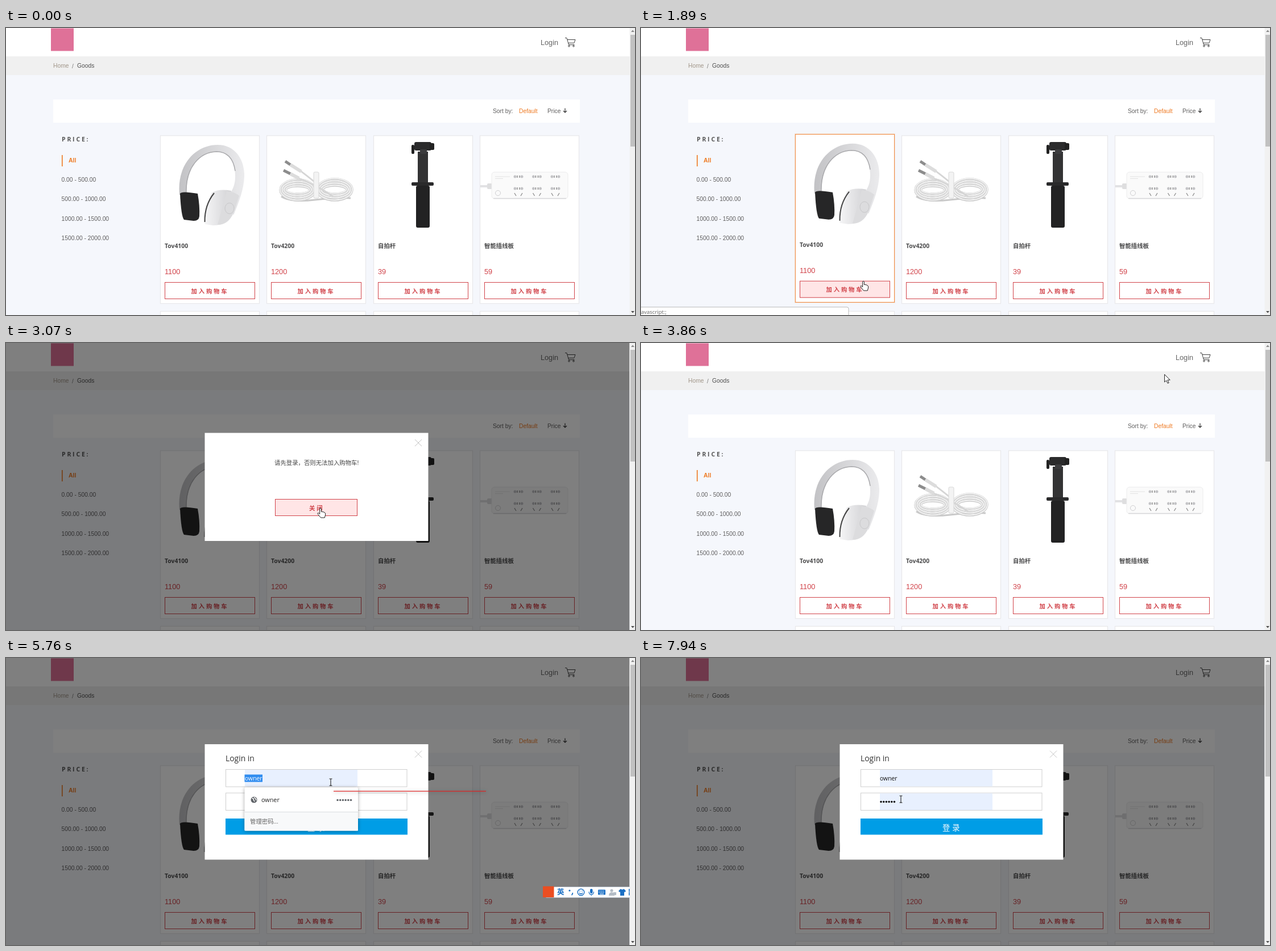
Animation, 1106 px wide and 506 px high, one loop 7.99 s. Source, as an HTML page:

```html
<!DOCTYPE html>
<html lang="en">
<head>
<meta charset="utf-8">
<title>Shop login</title>
<style>
  html, body { margin: 0; width: 100%; height: 100%; overflow: hidden; }
  svg { display: block; width: 100%; height: 100%; }
  text { font-family: "Liberation Sans", "Noto Sans CJK SC", "Noto Sans CJK", sans-serif; white-space: pre; }
  .open { font-family: "Open Sans", "Noto Sans CJK SC", "Noto Sans CJK", sans-serif; }
  .bold { font-weight: 700; }
  .wide { letter-spacing: 2.9px; }
  .drop { filter: drop-shadow(0 1px 3px rgba(0, 0, 0, .35)); }
</style>
</head>
<body>
<svg id="stage" viewBox="0 0 1106 506"></svg>
<script>
const LOOP = 7990;
const RED = '#d1434a', ORANGE = '#ee7a23', BLUE = '#1a6fc4';

// Markup helpers
const rect = (x, y, w, h, fill, extra = '') =>
  `<rect x="${x}" y="${y}" width="${w}" height="${h}" fill="${fill}" ${extra}/>`;
const path = (d, stroke, width = 1, fill = 'none', extra = '') =>
  `<path d="${d}" stroke="${stroke}" stroke-width="${width}" fill="${fill}" ${extra}/>`;
const circle = (x, y, r, fill, extra = '') =>
  `<circle cx="${x}" cy="${y}" r="${r}" fill="${fill}" ${extra}/>`;
const ring = (x, y, rx, ry, stroke, width) =>
  `<ellipse cx="${x}" cy="${y}" rx="${rx}" ry="${ry}" fill="none" stroke="${stroke}" stroke-width="${width}"/>`;
const text = (x, y, label, size = 10.3, fill = '#605f5f', cls = '') =>
  `<text x="${x}" y="${y}" font-size="${size}" fill="${fill}" class="${cls}">${label}</text>`;
const group = (id, body, extra = '') => `<g id="${id}" ${extra}>${body}</g>`;
const repeat = (n, fn) => Array.from({ length: n }, (_, i) => fn(i)).join('');
const dots = (x, y, fill) => repeat(6, i => circle(x + i * 4.7, y, 1.75, fill));
const gradient = (id, from, to) => `<linearGradient id="${id}">
  <stop stop-color="${from}"/><stop offset="1" stop-color="${to}"/></linearGradient>`;

const headphones =
  path('M305 294C300 240 334 206 372 206C405 206 420 235 419 262C418 285 410 306 400 330L388 300C400 285 403 275 403 262C403 238 395 219 370 218C340 219 316 245 317 294Z',
    'none', 0, 'url(#band)') +
  path('M317 290C316 246 340 219 370 218C390 218 400 232 403 252', '#a9a9ac', 1.5) +
  path('M306 292Q308 287 337 292Q341 314 340 332Q339 340 330 340L313 338Q308 332 306 292Z', 'none', 0, '#262627') +
  path('M362 290Q376 283 396 287L386 340Q380 348 364 348L350 346Q345 336 353 313Z', 'none', 0, 'url(#cup)') +
  path('M349.500 342Q349 312 366 291', '#444', 2) +
  path('M388 288Q401 288 410 296L400 326Q391 347 372 347Z', 'none', 0, '#dcdcde') +
  ring(393, 318, 8, 9.5, '#c8c8ca', 1);

const cable =
  path('M484 297Q500 308 543 303T606 300', '#c9c9c9', 3) +
  repeat(4, i => ring(513, 285.5, 31 - i * 3.5, 18.5 - i * 4, '#c8c8c8', 3.4) +
    ring(513, 285, 31 - i * 3.5, 18.5 - i * 4, '#efefef', 2.2) +
    ring(578, 285, 31 - i * 3.5, 19 - i * 4, '#c8c8c8', 3.4) +
    ring(578, 284.5, 31 - i * 3.5, 19 - i * 4, '#f1f1f1', 2.2)) +
  path('M512 264Q545 276 575 297M518 252Q535 265 548 276', '#d5d5d5', 2.8) +
  path('M491 235L500 241M488 251L500 257', '#8c8c8c', 5) +
  path('M500 241L519 253M500 257L515 265', '#dcdcdc', 6) +
  rect(541, 254, 9, 46, '#f3f3f3', 'rx="2" stroke="#d8d8d8"');

const stick =
  rect(724, 218, 18, 58, '#333334') + rect(721, 278, 24, 74, '#222223', 'rx="3"') +
  rect(718, 201, 30, 15, '#2b2b2c', 'rx="3"') + rect(713, 206, 5, 16, '#222', 'rx="2"') +
  rect(745, 203, 8, 12, '#222', 'rx="2"') + rect(728, 214, 12, 8, '#3c3c3e', 'rx="2"') +
  rect(713, 272, 39, 6, '#2a2a2b', 'rx="2"');

const sockets =
  path('M834 279H856', '#e2e2e4', 4) + rect(846, 274, 9, 10, '#dededf', 'rx="2"') +
  rect(854, 254, 134, 47, '#fafafa', 'rx="5" stroke="#ececed"') +
  path('M857 300.500H985', '#d8d8d9', 1.5) + path('M860 262H886M860 265.500H874', '#e2e2e2', 1) +
  circle(865, 291, 4.5, 'none', 'stroke="#cfcfd1"') +
  repeat(3, i => {
    const x = 901 + i * 32.5;
    return [262, 283].map(y => circle(x - 6, y, 2.5, '#c4c4c7') + circle(x + 6, y, 2.5, '#c4c4c7') +
      path(`M${x - 2} ${y - 2}v4M${x + 2} ${y - 2}v4`, '#777', 1.2)).join('') +
      path(`M${x - 7} 291l3 5M${x + 7} 291l-3 5`, '#8c8c8c', 1.3);
  });

const products = [
  ['Tov4100', 1100, headphones], ['Tov4200', 1200, cable], ['自拍杆', 39, stick], ['智能插线板', 59, sockets]
];
const cardX = i => Math.floor(271 + i * 187.5);
const cardFrame = (i, y, extra) => rect(cardX(i) + .5, y, 174, 296, '#fff', extra);
const plainEdge = 'stroke="#e8e8ea" stroke-width="1.2"';

const card = ([name, price, photo], i) => {
  const x = cardX(i);
  return group('card' + i,
    cardFrame(i, 189.8, plainEdge) +
    group('glow' + i, cardFrame(i, 189.8, `stroke="${ORANGE}" stroke-width="3" stroke-opacity=".2"`) +
      cardFrame(i, 189.8, `stroke="${ORANGE}" stroke-opacity=".8"`)) +
    photo + text(x + 8, 388, name, 10.4, '#4c4c4d', 'open bold') +
    text(x + 8, 434, price, 12.7, RED) +
    rect(x + 8.5, 448.5, 158, 29, '#fff', `id="buy${i}" stroke="${RED}"`) +
    text(x + 54.5, 467.5, '加入购物车', 10.3, RED, 'bold wide'));
};

const page =
  `<defs>${gradient('band', '#c2c2c5', '#ebebed')}${gradient('cup', '#f6f6f7', '#d2d2d5')}</defs>` +
  rect(0, 0, 1106, 506, '#f5f7fc') + rect(0, 0, 1097, 50, '#fff') + rect(0, 50, 1097, 33, '#f0f0f0') +
  rect(79, 0.5, 40, 40, '#df7198') +
  text(940, 30, 'Login', 12.7, '#666') +
  path('M983 17.500H986L989.500 29.500H999.500M986.800 20.500H1001L999 26.500H988.500', '#444', 1) +
  circle(990, 31.8, 1.3, 'none', 'stroke="#444"') + circle(998, 31.8, 1.3, 'none', 'stroke="#444"') +
  text(83, 69.5, 'Home', 10.3, '#a09588') + text(116, 71, '/', 10, '#777') + text(125, 69.5, 'Goods', 10.3, '#505050') +
  rect(83, 126, 926, 41, '#fff') + text(856, 149.5, 'Sort by:') + text(902, 149.5, 'Default', 10.3, ORANGE) +
  text(952, 149.5, 'Price') + path('M983 141.500V149M980 146L983 149L986 146', '#333', 1.2) +
  `<text x="98" y="200" font-size="10.5" fill="#555" class="open bold" letter-spacing="2.8">PRICE:</text>` +
  rect(98, 224, 1.6, 20, ORANGE) + text(110, 237, 'All', 10.5, ORANGE, 'bold') +
  ['0.00 - 500.00', '500.00 - 1000.00', '1000.00 - 1500.00', '1500.00 - 2000.00']
    .map((range, i) => text(97.5, 271 + i * 34.3, range)).join('') +
  products.map(card).join('') +
  repeat(4, i => cardFrame(i, 499.5, plainEdge));

const closeCross = y => path(`M719 ${y - 6}l12 12m0-12l-12 12`, '#c4c4c4', 1);

const notice =
  rect(349.5, 158.5, 393, 190.5, '#fff') + closeCross(176) +
  text(472, 214.5, '请先登录，否则无法加入购物车!', 10.4, '#444') +
  rect(473.5, 275.5, 144, 29, '#fff', `id="closeButton" stroke="${RED}"`) +
  text(533, 294.5, '关闭', 10.4, RED, 'bold wide');

const input = y => rect(386.5, y, 318.5, 30.5, '#fff', 'stroke="#cfcfcf"') + rect(420, y + .5, 198, 29.5, '#e8f0fe');

const login =
  rect(349.5, 152, 393, 203.5, '#fff') + closeCross(169.5) +
  text(386, 182, 'Login in', 13.9, '#333', 'open') +
  input(196.5) + input(238) +
  rect(419.5, 205.5, 31.5, 13, '#2f8cf0', 'id="selection"') +
  `<text id="user" x="420" y="215.5" font-size="10.4" class="open">owner</text>` +
  dots(422, 253.5, '#111') +
  rect(386, 283, 320, 28.5, '#009de6') +
  `<text x="530" y="303.5" font-size="13.3" fill="#fff" letter-spacing="4">登录</text>`;

const suggestions =
  rect(419.5, 228, 199.5, 76.5, '#fff', 'rx="2" class="drop"') +
  rect(419.5, 228, 199.5, 43, '#f1f3f4', 'id="hoverRow"') +
  rect(419.5, 271, 199.5, 33.5, '#f8f9fa') + path('M419.500 271.500H619', '#dadce0') +
  circle(436, 250, 5.5, '#5f6368') + path('M432.500 247l3 1.500 0 2.500 2 2M436 245.500l3 2.500 1 3', '#fff', 1.4) +
  text(449, 254, 'owner', 10.8, '#222', 'open') + dots(583, 250.5, '#5f6368') +
  text(429, 292, '管理密码...', 10.4, '#666', 'open');

const inputBar =
  rect(950, 403.5, 160, 19, '#fff', 'stroke="#aab4c0"') + rect(944, 402.5, 19.5, 19.5, '#ea4e22') +
  text(969, 417, '英', 12.5, BLUE, 'bold') + circle(991, 410, 1.6, BLUE) + path('M996 414q1 2-1.500 4', BLUE, 1.8) +
  circle(1011, 413, 5.8, 'none', `stroke="${BLUE}" stroke-width="1.4"`) +
  path('M1008 414q3 4 6 0M1009 410v1.500M1013 410v1.500', BLUE, 1.3) +
  rect(1027, 407, 4.5, 8, BLUE, 'rx="2"') + path('M1025 412q0 5 4.200 5t4.200-5M1029.200 417v2', BLUE, 1.2) +
  rect(1041, 408.5, 13, 9, BLUE, 'rx="1"') + path('M1042.500 411h10M1042.500 413.500h10', '#fff', 1, 'none', 'stroke-dasharray="1.500 1"') +
  path('M1044 416h7', '#fff', 1) +
  circle(1065, 410, 2.6, '#b3bcc6') + path('M1060 419q0-6 5-6t5 6Z', 'none', 0, '#b3bcc6') + rect(1068, 413, 5, 5, '#b3bcc6') +
  path('M1080 407.500h2q1.500 2 3 0h2l3 3.500-2 2-1-1v7h-7v-7l-1 1-2-2Z', 'none', 0, BLUE) +
  repeat(4, i => rect(1095.5 + (i % 2) * 6.5, 407.5 + (i >> 1) * 6, 4.5, 4.5, i === 1 ? 'none' : BLUE, `stroke="${BLUE}"`));

const scrollbar =
  rect(1096.5, 0, 10, 506, '#f1f1f1') + rect(1098, 12, 8, 197, '#c1c1c1') +
  path('M1099 7l3-3.500 3 3.500Z', 'none', 0, '#8a8a8a') + path('M1099 499l3 3.500 3-3.500Z', 'none', 0, '#505050');

const pointers =
  group('arrow', path('M0 0V13.500L3.200 10.700L5.500 15.700L7.600 14.800L5.400 9.800H9.700Z', '#222', 1, '#fff')) +
  group('hand', path('M-1.300 1.200Q0-1 1.400 1.200V6.500Q5.500 6 8 8.500Q9 9.500 8.600 12L7.300 17H.5L-4.800 10.500Q-5.500 8-3.300 8.700L-1.300 10.500Z', '#222', 1, '#fff')) +
  group('beam', path('M-2.500-6H-.8L0-5.300L.8-6H2.500M0-5.300V5.300M-2.500 6H-.8L0 5.300L.8 6H2.500', '#222', 1.1));

document.getElementById('stage').innerHTML =
  page + group('dim', rect(0, 0, 1096.5, 506, '#000', 'opacity=".5"')) +
  group('notice', notice) + group('login', login) + group('suggestions', suggestions) +
  group('panel', rect(576, 235, 268, 178, '#fff', 'id="panelBody"') + rect(576, 234.3, 268, 1.2, '#e02020'), 'class="drop"') +
  group('inputBar', inputBar) +
  group('status', path('M-2 492H362Q365 492 365 495V508H-2Z', '#b8b8b8', 1, '#fff') +
    `<text id="link" x="0" y="503.5" font-size="9.5" fill="#666" class="open"></text>`) +
  scrollbar + group('pointer', pointers);

// Timeline
const el = id => document.getElementById(id);
const show = (id, on) => el(id).setAttribute('display', on ? 'inline' : 'none');
const set = (id, name, value) => el(id).setAttribute(name, value);
const clamp = v => Math.max(0, Math.min(1, v));
const within = (t, [from, to]) => t >= from && t < to;

// Same curve as the CSS "ease" keyword
function ease(x) {
  x = clamp(x);
  let lo = 0, hi = 1;
  for (let i = 0; i < 14; i++) {
    const u = (lo + hi) / 2;
    if (.75 * u * (1 - u) + u ** 3 < x) lo = u; else hi = u;
  }
  return .3 * lo * (1 - lo) ** 2 + 3 * lo * lo * (1 - lo) + lo ** 3;
}

const track = [
  [400, 885, 500], [500, 720, 470], [600, 455, 440], [880, 411, 432], [1200, 411, 432], [1480, 388, 447],
  [1620, 388, 447], [1640, 391, 446], [2250, 391, 446], [2650, 572, 325], [2770, 553, 291], [3140, 553, 291],
  [3730, 915, 62], [3780, 915, 62], [4080, 946, 25], [4410, 946, 25], [4570, 715, 165], [4800, 571, 219],
  [6240, 571, 219], [6400, 540, 248], [6780, 540, 248], [7180, 402, 250], [7340, 402, 250], [7500, 384, 246],
  [7900, 457, 249]
];

function pointerAt(t) {
  const next = track.findIndex(k => k[0] > t);
  if (next < 0) return track[track.length - 1].slice(1);
  const [t0, x0, y0] = track[Math.max(0, next - 1)], [t1, x1, y1] = track[next];
  const p = clamp((t - t0) / (t1 - t0 || 1)), s = p * p * (3 - 2 * p);
  return [x0 + (x1 - x0) * s, y0 + (y1 - y0) * s];
}

const hovers = [[[600, 2290]], [[540, 600], [3140, 3270]], [[460, 540], [3270, 3390]], [[400, 460]]];
const hoverAt = (t, spans) => Math.max(...spans.map(([from, to]) =>
  t < from ? 0 : ease((Math.min(t, to) - from) / 300) * (1 - ease((t - to) / 300))));

const noticeSpan = [2010, 3130], loginSpan = [4240, LOOP];
const buyHover = [1270, 2290], closeHover = [2700, 3130], linkHover = [4050, 4650];
const hands = [[1270, 2010], closeHover, [4050, 4240]];
const beams = [[4760, 6290], [6900, 7400], [7530, LOOP]];

function dialog(id, t, span, lift) {
  const p = ease((t - span[0]) / 500);
  show(id, within(t, span));
  set(id, 'opacity', p);
  set(id, 'transform', `translate(0 ${(1 - p) * lift})`);
}

function frame() {
  const t = performance.now() % LOOP;

  hovers.forEach((spans, i) => {
    const p = hoverAt(t, spans);
    set('card' + i, 'transform', `translate(0 ${-2.3 * p})`);
    set('glow' + i, 'opacity', p);
  });
  set('buy0', 'fill', within(t, buyHover) ? '#ffe5e6' : '#fff');
  set('closeButton', 'fill', within(t, closeHover) ? '#ffe5e6' : '#fff');

  show('dim', within(t, noticeSpan) || within(t, loginSpan));
  dialog('notice', t, noticeSpan, 37);
  dialog('login', t, loginSpan, 37);

  const selected = within(t, [4980, 6800]);
  show('selection', selected);
  set('user', 'fill', selected ? '#fff' : '#111');
  show('suggestions', within(t, [5060, 6420]));
  show('hoverRow', t > 6320);
  show('panel', within(t, [5740, 6450]));
  set('panelBody', 'height', 178 * clamp((t - 5800) / 80));
  show('inputBar', within(t, [5200, 7600]));

  const onLink = within(t, linkHover);
  show('status', onLink || within(t, buyHover));
  el('link').textContent = onLink ? 'avascript:void(0)' : 'avascript:;';

  const [x, y] = pointerAt(t);
  const hand = hands.some(s => within(t, s)), beam = beams.some(s => within(t, s));
  show('pointer', t >= 400);
  set('pointer', 'transform', `translate(${x} ${y})`);
  show('hand', hand);
  show('beam', beam);
  show('arrow', !hand && !beam);

  requestAnimationFrame(frame);
}
frame();
</script>
</body>
</html>
```
